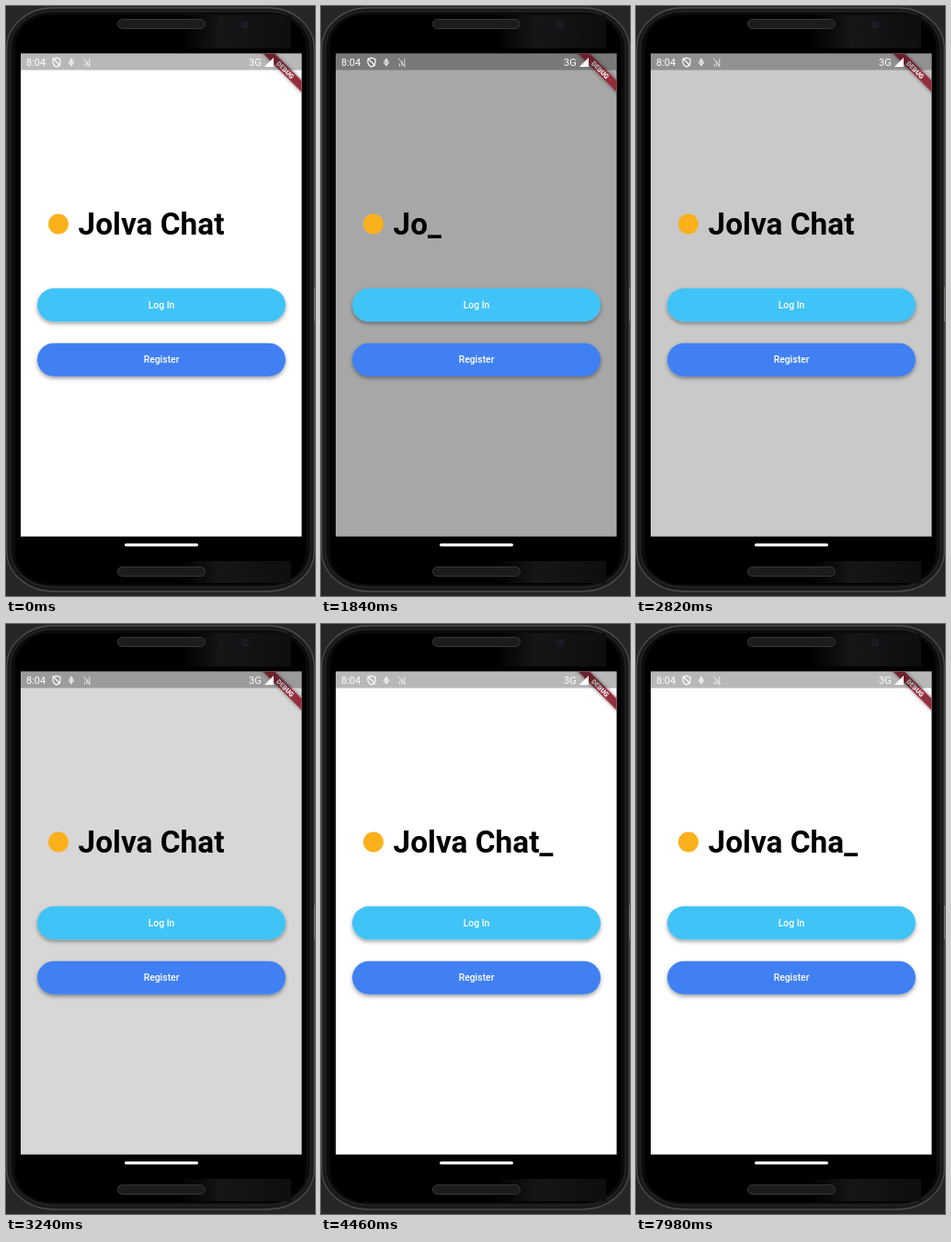
An HTML page for the animation above (8 s loop, 336 by 640 pixels).

```html
<!DOCTYPE html>
<html lang="en">
<head>
<meta charset="utf-8">
<title>Welcome screen</title>
<style>
  html, body { margin: 0; width: 100%; height: 100%; overflow: hidden; background: #262626; }
  svg { display: block; width: 100vw; height: 100vh; font-family: Roboto, sans-serif; }
  .label { font-size: 10.4px; font-weight: 500; fill: #fff; text-anchor: middle; }
  .status { font-size: 11px; fill: #fff; }
</style>
</head>
<body>
<svg viewBox="0 0 336 640" preserveAspectRatio="none">
  <defs>
    <linearGradient id="gloss">
      <stop offset=".55" stop-color="#000"/>
      <stop offset=".72" stop-color="#161618"/>
      <stop offset="1" stop-color="#0e0e10"/>
    </linearGradient>
    <filter id="lift" x="-10%" y="-30%" width="120%" height="180%">
      <feDropShadow dx="0" dy="2.2" stdDeviation="1.9" flood-color="#000" flood-opacity=".38"/>
    </filter>
    <filter id="soft" x="-20%" y="-60%" width="140%" height="220%">
      <feDropShadow dx="0" dy="0" stdDeviation="2" flood-color="#000" flood-opacity=".45"/>
    </filter>
    <clipPath id="view"><rect x="16" y="51.5" width="305.5" height="524"/></clipPath>
  </defs>

  <!-- phone body -->
  <rect width="336" height="640" fill="#262626"/>
  <rect x=".8" y="2" width="334.4" height="633" rx="50" ry="44" fill="#1a1a1c" stroke="#4c4c4e" stroke-width="1.3"/>
  <rect x="5" y="6" width="326" height="624" rx="45" ry="40" fill="#0b0b0d" stroke="#2a2a2c"/>
  <rect x="10" y="10" width="316" height="617" rx="38" ry="34" fill="#000"/>
  <rect x="40" y="10" width="270" height="36" fill="url(#gloss)"/>
  <rect x="40" y="602" width="270" height="24" fill="url(#gloss)"/>
  <path d="M335.5 305V342" stroke="#707072"/>
  <g fill="#1c1c1e" stroke="#38383a">
    <rect x="121.5" y="14.5" width="95" height="10" rx="5"/>
    <rect x="121.5" y="608.5" width="95" height="10" rx="5"/>
    <circle cx="260" cy="20.5" r="3.5" fill="#181826" stroke="#242428"/>
  </g>
  <rect x="129" y="583" width="80" height="3.2" rx="1.6" fill="#fff"/>

  <g clip-path="url(#view)">
    <rect id="page" x="16" y="51" width="306" height="525"/>

    <!-- corner ribbon -->
    <g transform="translate(321.5 51.5) rotate(45)">
      <rect x="-32" y="20.8" width="64" height="8.9" fill="#922f3e" filter="url(#soft)"/>
      <text y="27.8" font-size="7.3" font-weight="900" fill="#fff" text-anchor="middle">DEBUG</text>
    </g>

    <!-- status bar -->
    <rect x="16" y="51" width="306" height="18.5" fill="#000" opacity=".28"/>
    <text class="status" x="22" y="64.7">8:04</text>
    <g fill="none" stroke="#fff" stroke-width="1.2">
      <path d="M55 56.2l4 1.4v3.2q0 3.4-4 5.2q-4-1.8-4-5.2v-3.2zM51 56.6l8 8.4"/>
      <path d="M71 56.8v8.6M68.4 60.5q0 3 2.6 3t2.6-3" stroke-width="1"/>
      <circle cx="71" cy="59.6" r="1.5" stroke-width="1"/>
      <path d="M84 56.5l7.5 9.5M85.5 65.5v-3M88 65.5v-6M90.8 65.5v-8.5" stroke-width=".9" opacity=".8"/>
    </g>
    <text class="status" x="264" y="64.7">3G</text>
    <path d="M291 56v10h-10z" fill="#fff"/>

    <circle cx="57" cy="236.5" r="11" fill="#fbb11c"/>
    <text id="title" x="78.5" y="248.2" font-size="33.4" font-weight="700"></text>

    <rect x="34" y="306.3" width="270" height="36" rx="18" fill="#40c3f6" filter="url(#lift)"/>
    <text class="label" x="169" y="328">Log In</text>
    <rect x="34" y="365.7" width="270" height="36" rx="18" fill="#4080f3" filter="url(#lift)"/>
    <text class="label" x="169" y="387.2">Register</text>
  </g>
</svg>
<script>
const LOOP = 8000;
const NAME = "Jolva Chat";
const STEP = 93.3;                  // ms per typed letter or blink
const LAST = NAME.length + 8;       // letters, then cursor blinks
const STARTS = [1588, 4490, 7100];  // typing begins
const FADE = 2800;
const GREY = 158, WHITE = 255;

const page = document.getElementById("page");
const title = document.getElementById("title");

function pageColor(t) {
  const k = (t - STARTS[0]) / FADE;
  const v = k < 0 || k > 1 ? WHITE : Math.round(GREY + (WHITE - GREY) * k);
  return `rgb(${v},${v},${v})`;
}

function typed(t) {
  const start = STARTS.filter(s => s <= t).pop();
  if (start === undefined) return NAME;
  const count = Math.min(LAST, Math.floor((t - start) / STEP));
  const cursor = count <= NAME.length || count % 2 === 0;
  return NAME.slice(0, count) + (cursor ? "_" : "");
}

function draw(t) {
  page.setAttribute("fill", pageColor(t));
  title.textContent = typed(t);
}

function tick() {
  draw(performance.now() % LOOP);
  requestAnimationFrame(tick);
}
tick();
</script>
</body>
</html>
```
